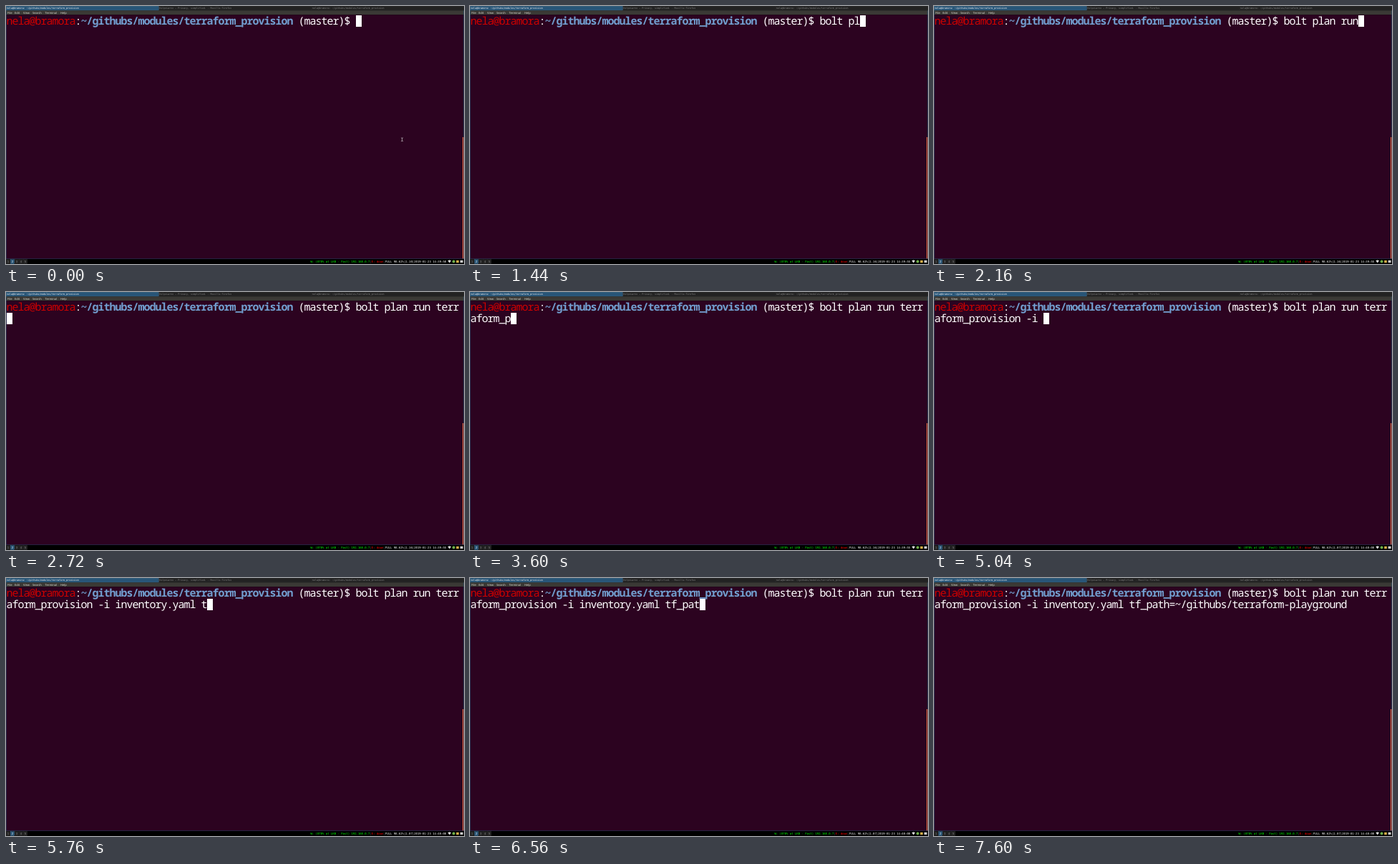
Write an HTML page that moves like this. It is 640x360 px and loops after 8 s.

```html
<!DOCTYPE html>
<html lang="en">
<head>
<meta charset="utf-8">
<title>Terminal</title>
<style>
  html, body { margin: 0; width: 100%; height: 100%; overflow: hidden; background: #000; }
  svg { display: block; width: 640px; height: 360px; }
  text { white-space: pre; text-rendering: geometricPrecision; }
  .term { font: 15px "Noto Sans Mono", monospace; letter-spacing: -1px; fill: #fff; }
  .user { fill: #cc0000; }
  .path { fill: #729fcf; font-weight: bold; }
  .tab { font: 3.29px "DejaVu Sans Mono", monospace; fill: #888; }
  .menu { font: 4.1px "Open Sans", sans-serif; fill: #dfdbd2; }
  .bar { font: 3.945px "DejaVu Sans Mono", monospace; fill: #fff; }
</style>
</head>
<body>
<svg viewBox="0 0 640 360">
  <!-- window tabs -->
  <rect width="640" height="6.3" fill="#222"/>
  <rect x=".2" y=".2" width="213" height="5.9" fill="#285577" stroke="#4c7899" stroke-width=".4"/>
  <path d="M213.4 .2H640M213.4 6.1H640M427 0V6.3" stroke="#333" stroke-width=".4"/>
  <text class="tab" x="1" y="4.2" style="fill:#fff">nela@bramora: ~/githubs/modules/terraform_provision</text>
  <text class="tab" x="214.5" y="4.2">KelpoLarno — Privacy, simplified. - Mozilla Firefox</text>
  <text class="tab" x="427.8" y="4.2">nela@bramora: ~/githubs/modules/terraform_provision</text>

  <!-- menu -->
  <rect y="6.3" width="640" height="6" fill="#3a3935"/>
  <g id="menu" class="menu"></g>

  <!-- terminal -->
  <rect y="12.3" width="640" height="341" fill="#2c0320"/>
  <rect x="637.7" y="12.3" width="1.7" height="340.4" fill="#260a1f"/>
  <rect x="638" y="183" width="1.4" height="169.6" fill="#ea6440"/>
  <path d="M.3 6.3V352.9H639.7V6.3" fill="none" stroke="#285577" stroke-width=".6"/>
  <text class="term" x=".5" y="26"><tspan class="user">nela@bramora</tspan>:<tspan class="path">~/githubs/modules/terraform_provision</tspan> (master)$ <tspan id="line0"></tspan></text>
  <text class="term" id="line1" x=".5" y="42"></text>
  <rect id="caret" width="8" height="16" fill="#fff"/>
  <path id="pointer" d="M552 184h1l.5 .4 .5-.4h1M553.5 184.4v3.8M552 188.6h1l.5-.4 .5 .4h1" fill="none" stroke="#ddd" stroke-width=".6"/>

  <!-- status bar -->
  <rect y="353.2" width="640" height="6.8" fill="#000"/>
  <g id="spaces" class="bar"></g>
  <text class="bar" x="425.5" y="358.1"><tspan fill="#00ff00">W: (070% at LKB - Fast) 192.168.0.7</tspan><tspan fill="#666">|</tspan><tspan fill="#ff0000">E: down</tspan><tspan fill="#666">|</tspan><tspan id="clock"></tspan></text>
  <path d="M617.4 355.4q2.3-1.7 4.6 0l-2.3 3z" fill="#ddd"/>
  <circle cx="625.6" cy="356.6" r="2" fill="#6fae4a"/>
  <rect x="629.2" y="354.9" width="3.6" height="3.4" fill="#d8b04a"/>
  <rect x="634.6" y="354.8" width="4" height="3.4" fill="#ccc"/>
</svg>
<script>
const $ = id => document.getElementById(id);
const NS = "http://www.w3.org/2000/svg";
const TICK = 80, LOOP = 8000;
const COLS = 79, PROMPT = 61, ROOM = COLS - PROMPT;
const CELL = 8, LINE = 16;

// Each entry is one key press; completions and pastes arrive whole.
const keys = [
  ..."bolt plan run terraform_provision -i in", "ventory.yaml ",
  ..."tf_path=", "~/githubs/terraform-playground"
];
const pressed = [
  7, 9, 10, 11, 13, 15, 18, 20,
  21, 22, 24, 25, 26, 28, 29, 31, 32, 34,
  35, 37, 38, 40, 42, 43, 45, 46, 48,
  49, 50, 51, 53, 54, 56, 58, 59, 62,
  63, 64, 65, 66,
  72, 74, 76, 77, 79, 81, 83, 85, 91
];
const blinks = [[3, 7], [90, 91], [95, 100]];
const status = [
  [0, "1.10", "14:39:50"],
  [14, "1.16", "14:39:55"],
  [59, "1.07", "14:40:00"]
];

function add(parent, tag, attrs, label = "") {
  const el = document.createElementNS(NS, tag);
  for (const name in attrs) el.setAttribute(name, attrs[name]);
  el.textContent = label;
  parent.append(el);
}

const menu = { File: 2, Edit: 12, View: 24, Search: 37, Terminal: 54.5, Help: 76 };
for (const name in menu) add($("menu"), "text", { x: menu[name], y: 10.8 }, name);

for (let i = 0; i < 5; i++) {
  const on = i === 1, x = 0.3 + i * 6;
  add($("spaces"), "rect", {
    x, y: 353.7, width: 5.3, height: 5.9, "stroke-width": 0.4,
    fill: on ? "#285577" : "#222", stroke: on ? "#4c7899" : "#333"
  });
  add($("spaces"), "text", { x: x + 1.5, y: 358.1, fill: on ? "#fff" : "#888" }, i + 1);
}
for (const el of $("spaces").querySelectorAll("text")) el.style.fill = el.getAttribute("fill");

const show = (el, on) => el.setAttribute("visibility", on ? "visible" : "hidden");

function draw(tick) {
  const typed = keys.slice(0, pressed.filter(t => t <= tick).length).join("");
  const col = PROMPT + typed.length;
  $("line0").textContent = typed.slice(0, ROOM);
  $("line1").textContent = typed.slice(ROOM);
  $("caret").setAttribute("x", 1 + CELL * (col % COLS));
  $("caret").setAttribute("y", 13 + LINE * Math.floor(col / COLS));
  show($("caret"), !blinks.some(([from, to]) => tick >= from && tick < to));
  show($("pointer"), tick < pressed[0]);
  const [, load, time] = status.filter(s => s[0] <= tick).pop();
  $("clock").textContent = `FULL 98.62%|${load}|2019-01-23 ${time}`;
}

const start = performance.now();
let last = -1;
function loop() {
  const tick = Math.floor(((performance.now() - start) % LOOP) / TICK);
  if (tick !== last) draw(last = tick);
  requestAnimationFrame(loop);
}
loop();
</script>
</body>
</html>
```
